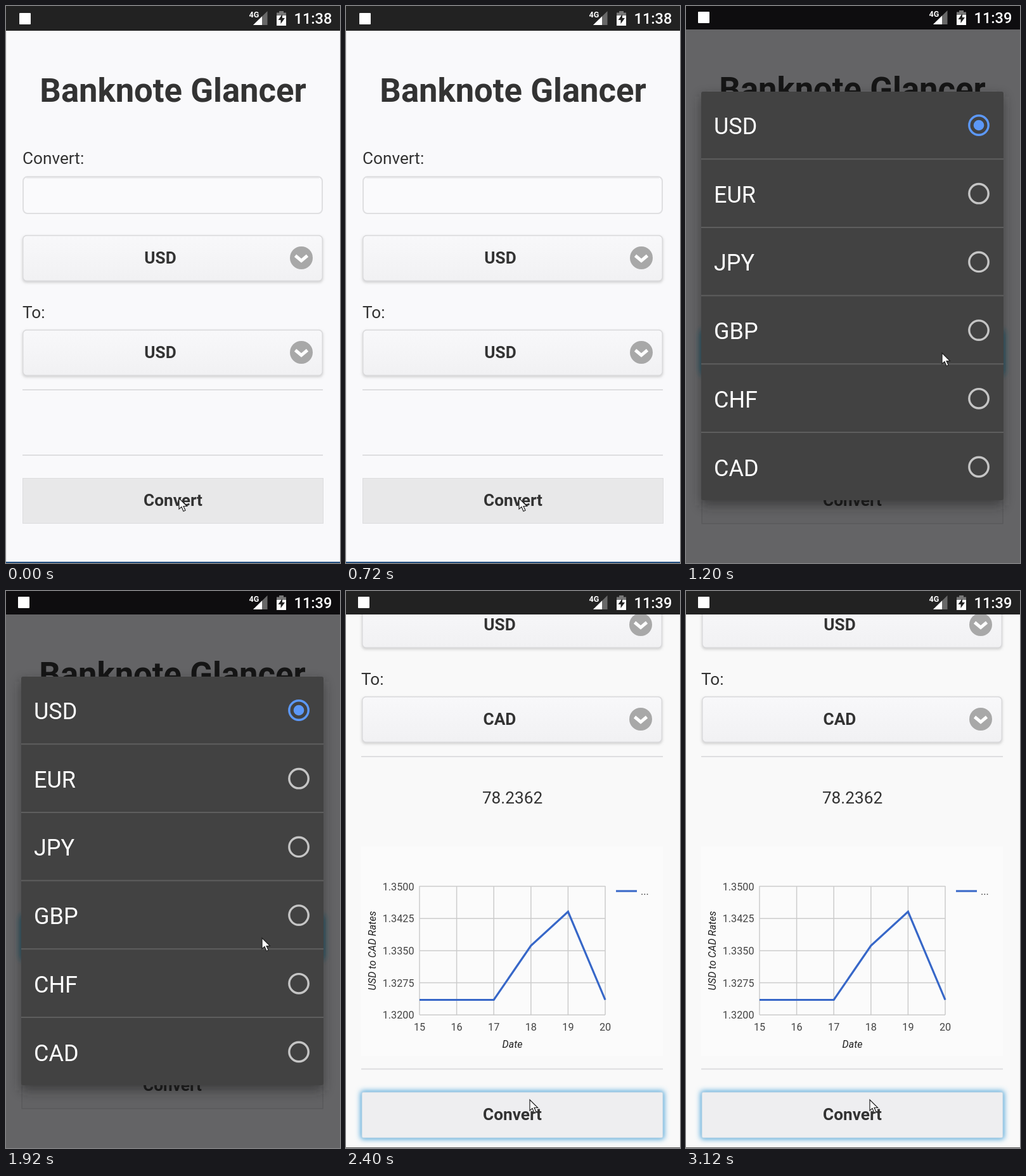
An HTML page for the animation above (3.6 s loop, 527 px wide and 878 px high).

```html
<!DOCTYPE html>
<html lang="en">
<head>
<meta charset="utf-8">
<title>Currency converter</title>
<style>
  html, body { margin: 0; width: 100%; height: 100%; overflow: hidden; background: #f9f9fb; }
  svg { display: block; width: 527px; height: 878px; font: 26.2px Roboto, sans-serif; fill: #333; }
  .screen { animation: show 3600ms step-end infinite; }
  #picker { animation-delay: -2400ms; }
  #result { animation-delay: -1200ms; }
  @keyframes show {
    0% { visibility: visible; }
    33.3333%, 100% { visibility: hidden; }
  }
  .bold { font-weight: 700; }
  .mid { text-anchor: middle; }
  .title { font-size: 52.6px; font-weight: 700; text-anchor: middle; }
  .clock { font-size: 23.6px; font-weight: 500; fill: #fff; }
  .rule { stroke: #dedee0; stroke-width: 2; }
  .options { font-size: 36px; fill: #fff; }
  .chart { font-size: 16.2px; fill: #444; }
  .chart .axis { font-style: italic; font-size: 16px; fill: #222; text-anchor: middle; }
</style>
</head>
<body>
<svg viewBox="0 0 527 878">
  <defs>
    <linearGradient id="face" x2="0" y2="1">
      <stop stop-color="#f8f8fa"/><stop offset="1" stop-color="#f1f1f3"/>
    </linearGradient>
    <filter id="soft" x="-10%" y="-30%" width="120%" height="160%"><feGaussianBlur stdDeviation="2"/></filter>
    <filter id="glow" x="-10%" y="-40%" width="120%" height="180%"><feGaussianBlur stdDeviation="4"/></filter>
    <filter id="shade" x="-10%" y="-10%" width="120%" height="120%"><feGaussianBlur stdDeviation="9"/></filter>
    <g id="icons">
      <text x="383.5" y="18" font-size="12.5" font-weight="700" fill="#fff" textLength="">4G</text>
      <path d="M390 30L412.500 8V30Z" fill="#686868"/>
      <path d="M390 30L404 16.300V30Z" fill="#fff"/>
      <path d="M427 10.500H431V8H438V10.500H442V17H427Z" fill="#777"/>
      <path d="M427 15H442V31H427Z" fill="#fff"/>
      <path d="M436 13L429.500 22H433.500V28L440 19H436Z" fill="#222"/>
    </g>
    <g id="select">
      <rect y="2" width="474" height="73" rx="6" fill="#bbb" opacity=".7" filter="url(#soft)"/>
      <rect x=".75" y=".75" width="472.5" height="71.500" rx="6" fill="url(#face)" stroke="#dadadc" stroke-width="1.500"/>
      <circle cx="440" cy="36" r="18" fill="#a8a8a8"/>
      <path d="M430.500 32.500L440 40.500L449.500 32.500" fill="none" stroke="#fff" stroke-width="5"/>
    </g>
    <path id="cursor" d="M0 0V17L4 13.500L7 20.500L10 19L7 12.500H12.500Z" fill="#fff" stroke="#222" stroke-width="1.200"/>
  </defs>

  <g class="screen" id="form">
    <rect width="527" height="878" fill="#f9f9fb"/>
    <path d="M.5 39V876" stroke="#e8e8ea"/>
    <rect width="527" height="39" fill="#222"/>
    <rect x="21" y="11" width="18" height="18" rx="1" fill="#fff"/>
    <use href="#icons"/>
    <text class="clock" x="454.500" y="28">11:38</text>
    <text class="title" x="263.500" y="151">Banknote Glancer</text>
    <text x="26" y="249">Convert:</text>
    <rect x="27" y="269" width="472" height="58" rx="7" fill="#fafafc" stroke="#dfdfe1" stroke-width="2"/>
    <path d="M32 270.500H494" stroke="#e6e6e8" stroke-width="2"/>
    <use href="#select" x="26" y="361"/>
    <text class="bold mid" x="243.500" y="406">USD</text>
    <text x="26" y="492">To:</text>
    <use href="#select" x="26" y="510"/>
    <text class="bold mid" x="243.500" y="555">USD</text>
    <path class="rule" d="M26 605H500M26 708H500"/>
    <rect x="26.500" y="744.500" width="474" height="71" fill="#e8e8e9" stroke="#dcdcde"/>
    <text class="bold mid" x="263.500" y="788">Convert</text>
    <rect y="876" width="527" height="2" fill="#245080"/>
    <use href="#cursor" x="273" y="776"/>
  </g>

  <g class="screen" id="picker">
    <rect width="527" height="878" fill="#646466"/>
    <rect width="527" height="37" fill="#0e0d0f"/>
    <rect x="19" y="9" width="18" height="18" rx="1" fill="#fff"/>
    <use href="#icons" y="-1"/>
    <text class="clock" x="454.500" y="27">11:39</text>
    <text class="title" x="262.500" y="149" fill="#151515">Banknote Glancer</text>
    <rect x="22" y="510" width="481" height="72" rx="6" fill="#1f5266" filter="url(#glow)"/>
    <rect x="25" y="745" width="475" height="71" fill="#626264" stroke="#555557"/>
    <text class="bold mid" x="262.500" y="788" fill="#151515">Convert</text>
    <rect x="24" y="143" width="476" height="644" fill="#222" opacity=".55" filter="url(#shade)"/>
    <rect x="24" y="135" width="477" height="644" rx="3" fill="#424242"/>
    <g class="options" id="options"></g>
    <use href="#cursor" x="404" y="547"/>
  </g>

  <g class="screen" id="result">
    <rect width="527" height="878" fill="#f9f9f9"/>
    <use href="#select" x="25" y="17"/>
    <text class="bold mid" x="242.500" y="61.500">USD</text>
    <rect width="527" height="37" fill="#222"/>
    <rect x="19" y="9" width="18" height="18" rx="1" fill="#fff"/>
    <use href="#icons" y="-1"/>
    <text class="clock" x="454.500" y="27">11:39</text>
    <text x="24" y="148">To:</text>
    <use href="#select" x="25" y="166"/>
    <text class="bold mid" x="242.500" y="211">CAD</text>
    <path class="rule" d="M24 261H500M24 753.500H500"/>
    <text class="mid" x="262.500" y="335">78.2362</text>
    <rect x="24" y="403" width="476" height="330" fill="#fbfbfb"/>
    <g class="chart">
      <g id="grid"></g>
      <path d="M116 644.500H233.200L291.800 559L350.400 505.500L409 644.500M426 473H459" fill="none" stroke="#3767c8" stroke-width="3.200"/>
      <text x="465" y="479">...</text>
      <text class="axis" x="262.500" y="720">Date</text>
      <text class="axis" transform="translate(46.500 567) rotate(-90)">USD to CAD Rates</text>
    </g>
    <rect x="23" y="788" width="479" height="76" rx="4" fill="#4aa3d8" filter="url(#glow)"/>
    <rect x="25" y="790" width="475" height="72" rx="2" fill="#eeeef0" stroke="#b9d3e4"/>
    <text class="bold mid" x="262.500" y="834">Convert</text>
    <path d="M0 877.500H527" stroke="#555"/>
    <use href="#cursor" x="290" y="802"/>
  </g>
</svg>
<script>
  const fill = (id, markup) => { document.getElementById(id).innerHTML = markup; };

  fill('options', ['USD', 'EUR', 'JPY', 'GBP', 'CHF', 'CAD'].map((code, i) => {
    const y = 188 + i * 107.7;
    const ring = color => `<circle cx="462" cy="${y}" r="15.2" fill="none" stroke="${color}" stroke-width="3.4"/>`;
    const mark = i ? ring('#c5c5c5') : ring('#5c98f8') + `<circle cx="462" cy="${y}" r="8.3" fill="#5c98f8"/>`;
    const line = i ? `<path d="M24 ${y - 54.5}H501" stroke="#5e5e5e" stroke-width="2"/>` : '';
    return `${line}<text x="44" y="${y + 14}">${code}</text>${mark}`;
  }).join(''));

  let grid = '';
  for (let i = 0; i < 6; i++) {
    const x = 116 + i * 58.6;
    grid += `<path d="M${x} 465V668" stroke="#ccc" stroke-width="1.5"/><text class="mid" x="${x}" y="693">${15 + i}</text>`;
  }
  for (let i = 0; i < 5; i++) {
    const y = 465.5 + i * 50.7;
    grid += `<path d="M116 ${y}H409" stroke="#ccc" stroke-width="1.5"/><text text-anchor="end" x="107.500" y="${y + 6}">${(1.35 - i * 0.0075).toFixed(4)}</text>`;
  }
  fill('grid', grid);
</script>
</body>
</html>
```
